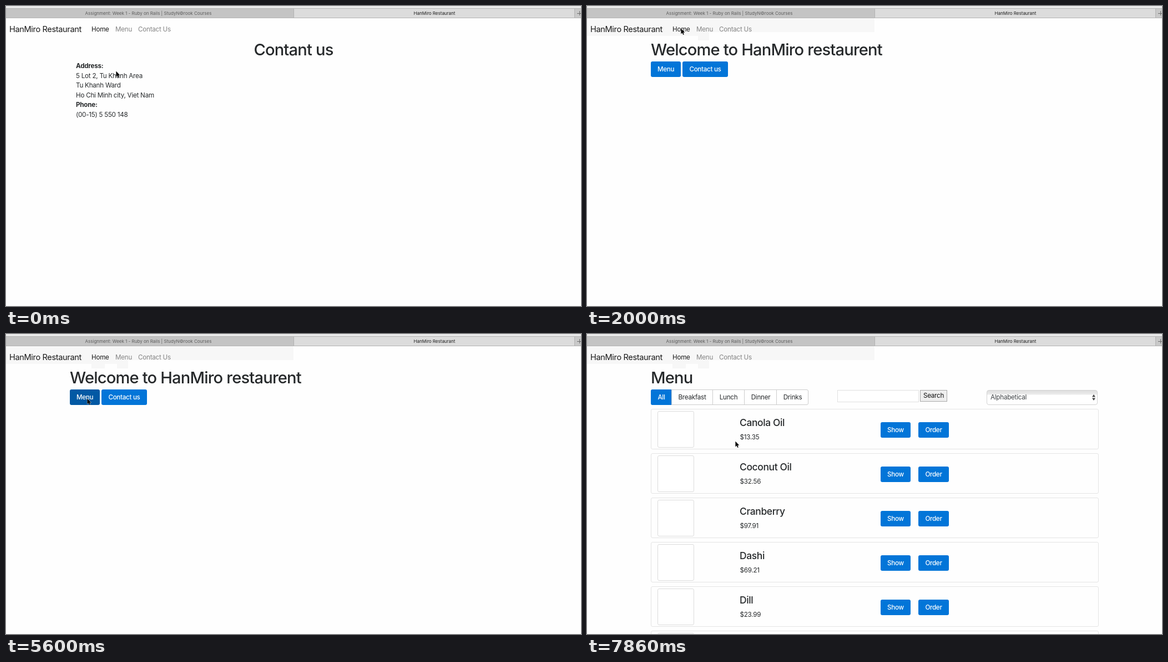
An HTML page that plays this animation: 1036 px wide and 541 px high, repeating every 8000 ms.

```html
<!DOCTYPE html>
<html lang="en">
<head>
<meta charset="utf-8">
<title>Restaurant site</title>
<style>
  html, body { margin: 0; width: 100%; height: 100%; overflow: hidden; background: #fefefe; }
  body {
    position: relative;
    font: 11.64px/17.45px Inter, "Liberation Sans", sans-serif;
    font-optical-sizing: none;
    letter-spacing: -.02em;
    color: #26292b;
    white-space: nowrap;
    cursor: default;
  }
  div, span, h1, h2, svg { position: absolute; box-sizing: border-box; }
  h1, h2 { margin: 0; font-weight: 500; }
  h1 { left: 115px; top: 63px; font-size: 29.1px; line-height: 32px; letter-spacing: -.028em; }
  h2 { font-size: 17.45px; line-height: 20px; letter-spacing: -.021em; }

  /* browser tabs */
  .bar { left: 0; top: 0; width: 1036px; height: 22px; background: #e9e9e9; }
  .tab {
    top: 4px; height: 18px; border: solid #b3b3b3; border-width: 1px 0;
    font-size: 8px; line-height: 16px; letter-spacing: 0; text-align: center;
  }
  .back { left: 0; width: 518px; padding-right: 5px; background: #c4c4c4; color: #5c5c5c; }
  .front { left: 518px; width: 507px; border-left: 1px solid #b3b3b3; background: #dcdcdc; color: #1c1c1c; }
  .add { left: 1024px; width: 12px; border-left: 1px solid #b3b3b3; background: #c9c9c9; }
  .add::before, .add::after { content: ""; position: absolute; background: #6b6b6b; }
  .add::before { left: 4px; top: 8px; width: 8px; height: 1px; }
  .add::after { left: 8px; top: 4px; width: 1px; height: 8px; }

  /* navigation */
  .shade { background: #f7f7f7; }
  .brand { left: 6px; top: 32px; font-size: 14.55px; line-height: 20px; letter-spacing: -.024em; color: #191919; }
  .nav { top: 34px; color: #858585; }
  .nav.on { color: #191919; }

  /* pages */
  .page { inset: 0; }
  .btn {
    height: 28px; border-radius: 3px; background: #0275d8; color: #fff;
    font-weight: 500; line-height: 28px; letter-spacing: -.026em; text-align: center;
  }
  .map { left: 529px; top: 100px; width: 436.5px; height: 327.5px; background: #e3e2de; }
  .thumb {
    left: 536px; top: 380.5px; width: 31.5px; height: 31.5px; border: 2px solid #fff; border-radius: 2px;
    background: #e3e2de; box-shadow: 0 1px 4px rgba(0, 0, 0, .38);
  }
  .filters { left: 115px; top: 100px; width: 284px; height: 28px; border: 1px solid #ccc; border-radius: 3px; background: #fff; }
  .filters span { top: -1px; height: 28px; line-height: 28px; text-align: center; border-left: 1px solid #ccc; }
  .filters .btn { left: -1px; width: 38px; border: 0; border-radius: 3px 0 0 3px; }
  .query { left: 450.5px; top: 100.5px; width: 147px; height: 22px; border: 1px solid #e0e0e0; background: #fff; }
  .search {
    left: 600px; top: 101px; width: 49px; height: 21px; border: 1px solid #a8a8a8;
    background: #efefef; color: #111; line-height: 19px; text-align: center;
  }
  .sort {
    left: 720px; top: 101px; width: 200px; height: 27px; border: 1px solid #d2d2d2; border-radius: 4px;
    background: linear-gradient(#dedede, #ececec 7px, #fff 8px); padding-left: 6px; line-height: 25px; color: #3d4144;
  }
  .sort svg { left: 189px; top: 7px; }
  .card { left: 115px; width: 807px; height: 73px; border: 1px solid #e4e4e4; border-radius: 3px; background: #fefefe; }
  .card .pic { left: 11px; top: 3px; width: 66px; height: 66px; border: 1px solid #dcdcdc; border-radius: 3px; background: #fff; }
  .card h2 { left: 159px; top: 14px; }
  .card .price { left: 159.5px; top: 42px; }
  .card .btn { top: 23px; }

  /* timing: 80 ms per percent */
  .page, .map, .thumb, .shade, .btn.menu, .btn.all, #cursor, #cursor path {
    animation: 8s step-end infinite;
  }
  .contact { animation-name: contact; }
  .home { animation-name: home; }
  .list { animation-name: list; }
  .thumb { animation-name: thumb; }
  .map { animation-name: map; }
  .shade { animation-name: shade; }
  .shade.late { animation-name: late; }
  .btn.menu { animation-name: menu; }
  .btn.all { animation-name: all; }
  #cursor { left: 0; top: 0; overflow: visible; animation-name: move; }
  #cursor .arrow { animation-name: arrow; }
  #cursor .hand { animation-name: hand; }

  @keyframes contact { 0% { opacity: 1 } 23.125%, 100% { opacity: 0 } }
  @keyframes home { 0% { opacity: 0 } 23.125% { opacity: 1 } 73.625%, 100% { opacity: 0 } }
  @keyframes list { 0% { opacity: 0 } 73.625%, 100% { opacity: 1 } }
  @keyframes thumb { 0% { opacity: 0 } 17.5%, 100% { opacity: 1 } }
  @keyframes map { 0% { opacity: 0 } 21.25%, 100% { opacity: 1 } }
  @keyframes shade { 0% { opacity: 0 } 5.875%, 100% { opacity: 1 } }
  @keyframes late { 0% { opacity: 0 } 38.125%, 100% { opacity: 1 } }
  @keyframes menu {
    0% { background: #0275d8 } 42% { background: #0259a4 }
    49.5% { background: #0270d0 } 64.375%, 100% { background: #0259a4 }
  }
  @keyframes all {
    0% { background: #0259a4 } 81.125%, 100% { background: #0275d8 }
  }
  @keyframes arrow {
    0% { opacity: 1 } 10% { opacity: 0 } 25% { opacity: 1 } 42% { opacity: 0 }
    49.5% { opacity: 1 } 64.375% { opacity: 0 } 70%, 100% { opacity: 1 }
  }
  @keyframes hand {
    0% { opacity: 0 } 10% { opacity: 1 } 25% { opacity: 0 } 42% { opacity: 1 }
    49.5% { opacity: 0 } 64.375% { opacity: 1 } 70%, 100% { opacity: 0 }
  }
  @keyframes move {
    0% { transform: translate(198px, 117px) }
    1.875% { transform: translate(205px, 92px) }
    3.875% { transform: translate(209px, 48px) }
    5.875% { transform: translate(192px, 14px) }
    8% { transform: translate(176px, 28px) }
    10% { transform: translate(169px, 40px) }
    38.125% { transform: translate(166px, 58px) }
    40.125% { transform: translate(160px, 82px) }
    42% { transform: translate(152px, 106px) }
    44% { transform: translate(148px, 116px) }
    49.5% { transform: translate(170px, 130px) }
    51.375% { transform: translate(198px, 147px) }
    53.25% { transform: translate(214px, 159px) }
    58.875% { transform: translate(219px, 166px) }
    60.75% { transform: translate(205px, 155px) }
    62.625% { transform: translate(180px, 138px) }
    64.375% { transform: translate(158px, 122px) }
    66.25% { transform: translate(146px, 116px) }
    81.125% { transform: translate(210px, 150px) }
    83.1875% { transform: translate(285px, 176px) }
    85.25% { transform: translate(316px, 182px) }
    87.125% { transform: translate(324px, 199px) }
    89% { transform: translate(240px, 165px) }
    90.75% { transform: translate(113px, 125px) }
    92.625% { transform: translate(178px, 144px) }
    94.5% { transform: translate(226px, 186px) }
    98.25%, 100% { transform: translate(267px, 193px) }
  }
</style>
</head>
<body>
  <div class="bar">
    <div class="tab back">Assignment: Week 1 - Ruby on Rails | StudyN©rook Courses</div>
    <div class="tab front">HanMiro Restaurant</div>
    <div class="tab add"></div>
  </div>

  <div class="shade" style="left:0;top:22px;width:518px;height:25px"></div>
  <div class="shade" style="left:0;top:47px;width:220px;height:7px"></div>
  <div class="shade" style="left:200px;top:54px;width:20px;height:8px"></div>
  <div class="shade late" style="left:154px;top:54px;width:24px;height:8px"></div>
  <span class="brand">HanMiro Restaurant</span>
  <span class="nav on" style="left:154px">Home</span>
  <span class="nav" style="left:197px">Menu</span>
  <span class="nav" style="left:238px">Contact Us</span>

  <div class="page contact">
    <h1 style="left:0;width:1036px;text-align:center">Contant us</h1>
    <div style="left:126px;top:100.4px">
      <b>Address:</b><br>5 Lot 2, Tu Khanh Area<br>Tu Khanh Ward<br>Ho Chi Minh city, Viet Nam<br>
      <b>Phone:</b><br>(00-15) 5 550 148
    </div>
    <div class="map"></div>
    <div class="thumb"></div>
  </div>

  <div class="page home">
    <h1>Welcome to HanMiro restaurent</h1>
    <div class="btn menu" style="left:115px;top:100px;width:54px">Menu</div>
    <div class="btn" style="left:172px;top:100px;width:82px">Contact us</div>
  </div>

  <div class="page list">
    <h1>Menu</h1>
    <div class="filters">
      <span class="btn all">All</span>
      <span style="left:36px;width:74px">Breakfast</span>
      <span style="left:110px;width:57px">Lunch</span>
      <span style="left:167px;width:59px">Dinner</span>
      <span style="left:225px;width:58px">Drinks</span>
    </div>
    <div class="query"></div>
    <div class="search">Search</div>
    <div class="sort">Alphabetical
      <svg width="6" height="11"><path d="M0 4.5L3 0L6 4.5ZM0 6.5L3 11L6 6.5Z" fill="#444"/></svg>
    </div>
  </div>

  <svg id="cursor" width="1" height="1">
    <path class="arrow" d="M.4 .4V10.4L2.7 8.3L4.2 11.9L5.8 11.2L4.3 7.7H7.3Z" fill="#000" stroke="#fff" stroke-width=".8" paint-order="stroke"/>
    <path class="hand" d="M-.6 7V1.2Q.4 -.2 1.4 1.2V4.6Q2.6 3.8 3.4 5Q4.6 4.2 5.4 5.5Q7 5 7.2 6.6V9.4L6.2 13H.6L-2.8 8.6Q-2.6 6.6 -.6 8.2ZM1.6 8.2V11M3.4 8.2V11M5.2 8.2V11" fill="#fff" stroke="#111" stroke-width=".9" stroke-linejoin="round"/>
  </svg>

<script>
  const dishes = [
    ["Canola Oil", "$13.35"], ["Coconut Oil", "$32.56"], ["Cranberry", "$97.91"],
    ["Dashi", "$69.21"], ["Dill", "$23.99"], ["", ""]
  ];
  const card = ([name, price], i) => `
    <div class="card" style="top:${135 + i * 80}px">
      <div class="pic"></div>
      <h2>${name}</h2>
      <span class="price">${price}</span>
      <div class="btn" style="left:413px;width:54px">Show</div>
      <div class="btn" style="left:481px;width:55px">Order</div>
    </div>`;
  document.querySelector(".list").insertAdjacentHTML("beforeend", dishes.map(card).join(""));
</script>
</body>
</html>
```
